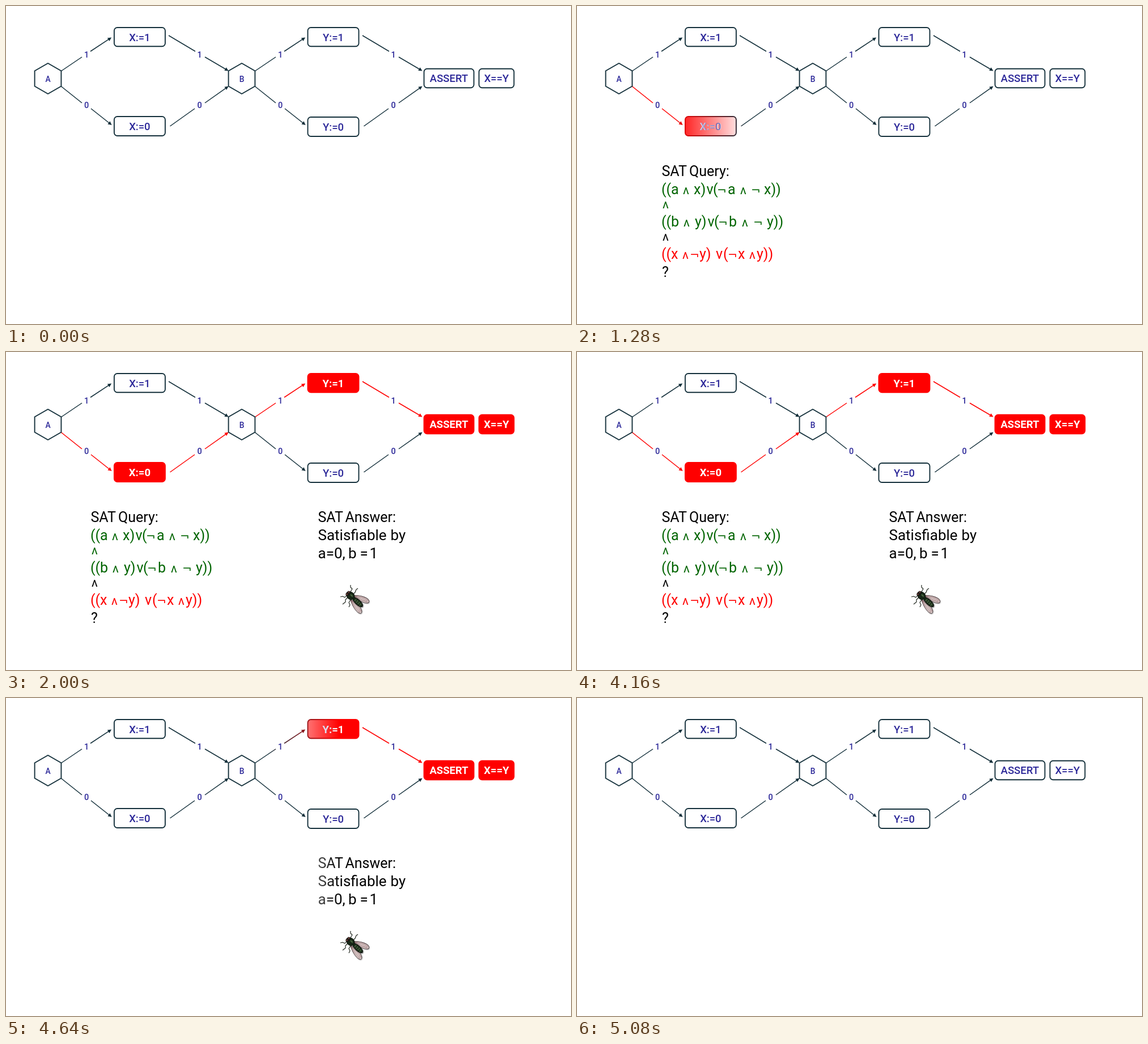
Recreate the animation shown at these times as an HTML page with a canvas. Size 997 by 561 pixels, loop 5200 ms.

```html
<!DOCTYPE html>
<html lang="en">
<head>
<meta charset="utf-8">
<title>SAT query on a branching program</title>
<style>
  html, body { margin: 0; width: 100%; height: 100%; overflow: hidden; background: #fff; }
  canvas { display: block; }
</style>
</head>
<body>
<canvas id="stage" width="997" height="561"></canvas>
<script>
const W = 997, H = 561, LOOP = 5200, STEP = 40;
const EDGE = W / 8;          // width of the soft wipe edge
const SPEED = W / 1000;      // wipe speed in px per ms
const INK = '#14303b', LABEL = '#2c2899', RED = '#ff0000', GREEN = '#006400', BLACK = '#000';
const FONT = 'Roboto, Inter, sans-serif';
const SPAN = 342;            // distance between the two branch stages

const stage = document.getElementById('stage').getContext('2d');

function makeLayer(paint) {
  const canvas = document.createElement('canvas');
  canvas.width = W;
  canvas.height = H;
  const c = canvas.getContext('2d');
  if (paint) {
    c.fillStyle = '#fff';
    c.fillRect(0, 0, W, H);
    paint(c);
  }
  return canvas;
}

function centered(c, text, x, y, size, color, weight = 500) {
  c.font = `${weight} ${size}px ${FONT}`;
  c.textAlign = 'center';
  c.fillStyle = color;
  c.fillText(text, x, y + size * 0.355);
}

function box(c, text, x, y, w, h, hot) {
  c.beginPath();
  c.roundRect(x, y, w, h, 5.5);
  c.lineWidth = 1.9;
  c.strokeStyle = hot ? RED : INK;
  c.fillStyle = hot ? RED : '#fff';
  c.fill();
  c.stroke();
  centered(c, text, x + w / 2, y + h / 2 + 0.4, 18.5, hot ? '#fff' : LABEL, hot ? 600 : 500);
}

function hexagon(c, text, x, y) {
  c.beginPath();
  for (const [dx, dy] of [[0, -27], [23.4, -13.5], [23.4, 13.5], [0, 27], [-23.4, 13.5], [-23.4, -13.5]]) {
    c.lineTo(x + dx, y + dy);
  }
  c.closePath();
  c.lineWidth = 1.9;
  c.strokeStyle = INK;
  c.stroke();
  centered(c, text, x, y + 0.9, 13.8, LABEL);
}

// A line broken by its label, ending in a small arrow head.
function arrow(c, text, [x1, y1, x2, y2, lx, ly, x3, y3, x4, y4], shift, hot) {
  c.save();
  c.translate(shift, 0);
  c.strokeStyle = hot ? RED : INK;
  c.lineWidth = 1.5;
  const angle = Math.atan2(y4 - y3, x4 - x3);
  c.beginPath();
  c.moveTo(x1, y1);
  c.lineTo(x2, y2);
  c.moveTo(x3, y3);
  c.lineTo(x4 - 4 * Math.cos(angle), y4 - 4 * Math.sin(angle));
  c.stroke();
  centered(c, text, lx, ly, 14.5, LABEL);
  c.fillStyle = hot ? RED : INK;
  c.translate(x4, y4);
  c.rotate(angle);
  c.beginPath();
  c.moveTo(0.8, 0);
  c.lineTo(-5.8, -3.3);
  c.lineTo(-5.8, 3.3);
  c.fill();
  c.restore();
}

const UP = [97, 115, 134, 90, 142, 85.7, 149, 80, 185.5, 56];
const DOWN = [97, 141.5, 134, 171, 142, 174.6, 150, 181, 186, 209.5];
const FROM_TOP = [287, 52, 334, 80, 341.5, 85.7, 351, 90, 392, 114];
const FROM_BOTTOM = [289.5, 212, 333, 181, 341.5, 174.6, 351, 171, 392, 142];

function diagram(c, hot) {
  [0, SPAN].forEach((shift, stageNo) => {
    const top = hot && stageNo === 1, bottom = hot && stageNo === 0;
    const name = 'XY'[stageNo], left = 190.9 + shift - stageNo * 0.4;
    arrow(c, '1', UP, shift, top);
    arrow(c, '0', DOWN, shift, bottom);
    arrow(c, '1', FROM_TOP, shift, top);
    arrow(c, '0', FROM_BOTTOM, shift, bottom);
    hexagon(c, 'AB'[stageNo], 74 + shift, 128);
    box(c, name + ':=1', left, 38, 90, 33.2, top);
    box(c, name + ':=0', left, 195 + stageNo, 90, 34, bottom);
  });
  box(c, 'ASSERT', 737.6, 110.8, 88, 33.4, hot);
  box(c, 'X==Y', 834.6, 110.8, 61.8, 33.4, hot);
}

const GLYPH_FONTS = { 'ʌ': `22px ${FONT}`, '¬': '20px "DejaVu Sans", sans-serif' };

// Words are given as x, text, x, text ...
function row(c, y, size, color, ...words) {
  c.textAlign = 'left';
  c.fillStyle = color;
  for (let i = 0; i < words.length; i += 2) {
    c.font = GLYPH_FONTS[words[i + 1]] || `400 ${size}px ${FONT}`;
    c.fillText(words[i + 1], words[i], y);
  }
}

function query(c) {
  row(c, 300, 25, BLACK, 149.5, 'SAT', 198, 'Query:');
  row(c, 332, 25, GREEN, 149, '((a', 187, 'ʌ', 206, 'x)', 228.5, 'v', 240, '(', 247, '¬', 266, 'a', 288, 'ʌ', 307, '¬', 330, 'x))');
  row(c, 357, 25, GREEN, 151, 'ʌ');
  row(c, 389, 25, GREEN, 149, '((b', 188, 'ʌ', 208, 'y)', 230.5, 'v', 242, '(', 249, '¬', 268, 'b', 291, 'ʌ', 311, '¬', 335, 'y))');
  row(c, 414, 25, BLACK, 151, 'ʌ');
  row(c, 446, 25, RED, 149, '((x', 186, 'ʌ', 199, '¬', 216, 'y)', 245, 'v', 258, '(', 266, '¬', 284, 'x', 304, 'ʌ', 317, 'y))');
  row(c, 478, 25, BLACK, 150, '?');
}

function answer(c) {
  row(c, 300, 25, BLACK, 550.5, 'SAT', 598.5, 'Answer:');
  row(c, 332, 26, BLACK, 550.5, 'Satisfiable', 678.5, 'by');
  row(c, 364, 26, BLACK, 550.5, 'a=0,', 604, 'b', 624.5, '=', 641.5, '1');
}

function oval(c, x, y, rx, ry, fill, line) {
  c.beginPath();
  c.ellipse(x, y, rx, ry, 0, 0, Math.PI * 2);
  c.fillStyle = fill;
  c.fill();
  if (line) {
    c.strokeStyle = line;
    c.stroke();
  }
}

function wing(c, x, y, angle, length) {
  c.save();
  c.translate(x, y);
  c.rotate(angle);
  c.lineWidth = 0.9;
  c.shadowColor = 'rgba(0,0,0,.5)';
  c.shadowBlur = 2;
  c.shadowOffsetX = c.shadowOffsetY = 1;
  c.beginPath();
  c.moveTo(0, 0);
  c.bezierCurveTo(length * 0.35, -7, length, -7, length, 0);
  c.bezierCurveTo(length, 5.5, length * 0.4, 5.5, 0, 0);
  c.fillStyle = '#e9dcda';
  c.strokeStyle = '#463638';
  c.fill();
  c.shadowColor = 'transparent';
  c.stroke();
  c.lineWidth = 0.6;
  c.beginPath();
  for (const bend of [-4, -2, 0.5, 2.5]) {
    c.moveTo(1, 0);
    c.quadraticCurveTo(length * 0.5, bend * 1.5, length * 0.93, bend * 0.6);
  }
  c.strokeStyle = '#7d5559';
  c.stroke();
  c.restore();
}

function fly(c) {
  c.save();
  c.lineWidth = 1.2;
  c.strokeStyle = '#222820';
  c.lineJoin = 'round';
  const legs = [
    [607, 424, 611, 418, 608, 415, 608, 411],
    [613, 427, 616, 424, 618, 419, 621, 417],
    [601, 429, 598, 433, 594, 431, 590, 432],
    [603, 433, 599, 437, 599, 441, 594, 445],
    [608, 437, 605, 442, 607, 446, 605, 450]
  ];
  for (const [x, y, ...rest] of legs) {
    c.beginPath();
    c.moveTo(x, y);
    for (let i = 0; i < rest.length; i += 2) c.lineTo(rest[i], rest[i + 1]);
    c.stroke();
  }
  wing(c, 613, 430, 0.39, 29.5);
  wing(c, 608, 437, 0.91, 30);
  c.translate(608, 430);
  c.rotate(0.74);
  c.shadowColor = 'rgba(0,0,0,.4)';
  c.shadowBlur = 2;
  c.shadowOffsetX = c.shadowOffsetY = 1;
  oval(c, 17, -0.2, 11, 4.3, '#20351f', '#0c120c');
  c.shadowColor = 'transparent';
  c.strokeStyle = '#67835a';
  c.lineWidth = 0.8;
  for (let x = 11; x < 26; x += 4) {
    c.beginPath();
    c.moveTo(x, -2.8);
    c.quadraticCurveTo(x + 1.5, 0, x, 2.6);
    c.stroke();
  }
  oval(c, 0, 0, 7.5, 6.5, '#172717', '#080e08');
  oval(c, 1, -1.5, 3, 1.4, '#46633e');
  oval(c, -6, 0, 2.8, 4.6, '#211b18', '#0b0b09');
  oval(c, -6.5, -2.6, 1.4, 1.3, '#70413a');
  oval(c, -6.5, 2.6, 1.4, 1.3, '#70413a');
  c.restore();
}

const plain = makeLayer(c => diagram(c, false));
const asked = makeLayer(c => { diagram(c, false); query(c); });
const solved = makeLayer(c => { diagram(c, true); query(c); answer(c); fly(c); });
const mask = makeLayer();
const maskCtx = mask.getContext('2d');

// Soft-edged wipe from left to right; "lead" is the x of its front.
function wipe(from, to, lead) {
  const fade = maskCtx.createLinearGradient(lead - EDGE, 0, lead, 0);
  fade.addColorStop(0, 'rgba(0,0,0,1)');
  fade.addColorStop(1, 'rgba(0,0,0,0)');
  maskCtx.globalCompositeOperation = 'copy';
  maskCtx.drawImage(to, 0, 0);
  maskCtx.globalCompositeOperation = 'destination-in';
  maskCtx.fillStyle = fade;
  maskCtx.fillRect(0, 0, W, H);
  stage.drawImage(from, 0, 0);
  stage.drawImage(mask, 0, 0);
}

function render(time) {
  const t = Math.floor((time % LOOP) / STEP) * STEP;
  if (t < 520 || t >= 5080) stage.drawImage(plain, 0, 0);
  else if (t < 1120) stage.drawImage(asked, 0, 0);
  else if (t < 2000) wipe(asked, solved, (t - 982) * SPEED);
  else if (t < 4160) stage.drawImage(solved, 0, 0);
  else wipe(solved, plain, (t - 4050) * SPEED);
}

const start = performance.now();
function tick() {
  render(performance.now() - start);
  requestAnimationFrame(tick);
}
tick();
</script>
</body>
</html>
```
